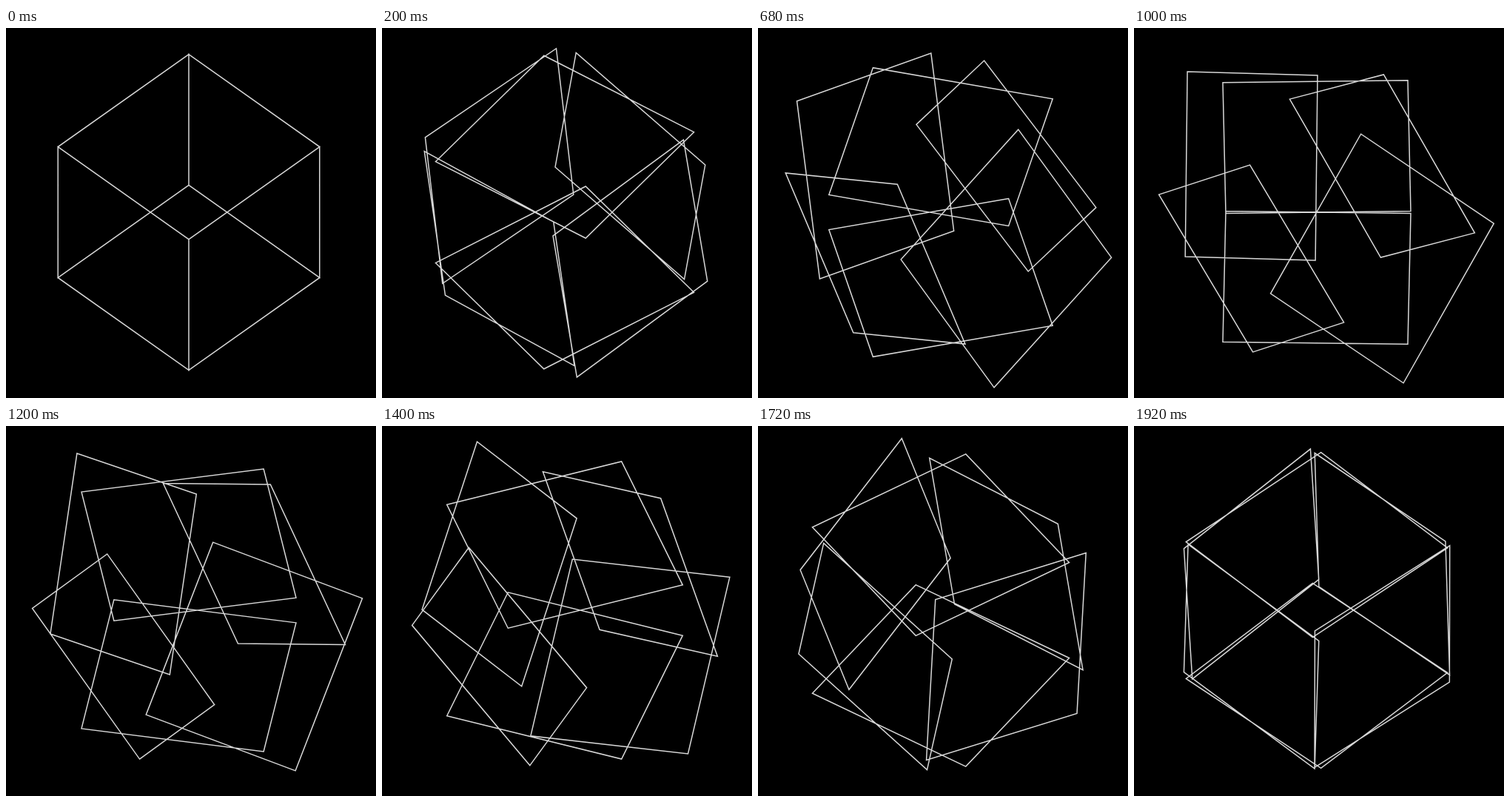
Write an HTML page with a canvas that moves like this. It is 500 by 500 pixels and loops after 1960 ms.

```html
<!DOCTYPE html>
<html lang="en">
<head>
<meta charset="utf-8">
<title>Turning cube faces</title>
<style>
html, body { margin: 0; width: 100%; height: 100%; overflow: hidden; background: #000; }
canvas { display: block; width: 500px; height: 500px; }
</style>
</head>
<body>
<canvas id="stage" width="500" height="500"></canvas>
<script>
const ctx = document.getElementById('stage').getContext('2d');
const HALF = 125, CX = 247, CY = 249;
const STEP = 40, STEPS = 49;
const r = Math.SQRT1_2;

// Cube axes after a 45° turn and a 45° tilt (screen y points down)
const X = [r, -0.5, 0.5];
const Y = [0, r, r];
const Z = [-r, -0.5, 0.5];

const scale = (v, k) => v.map(n => n * k);
const add = (a, b) => a.map((n, i) => n + b[i]);
const dot = (a, b) => a[0] * b[0] + a[1] * b[1] + a[2] * b[2];
const cross = (a, b) => [
  a[1] * b[2] - a[2] * b[1],
  a[2] * b[0] - a[0] * b[2],
  a[0] * b[1] - a[1] * b[0]
];

function rotate(v, axis, angle) {
  const c = Math.cos(angle), s = Math.sin(angle);
  const along = scale(axis, dot(axis, v) * (1 - c));
  return add(add(scale(v, c), scale(cross(axis, v), s)), along);
}

// Swinging faces turn about an axis that itself moves from -X to the normal
const faces = [];
for (const side of [1, -1]) {
  faces.push({ normal: scale(X, side), u: Y, v: Z });
  faces.push({ normal: scale(Y, side), u: Z, v: X });
  faces.push({ normal: scale(Z, side), u: X, v: Y, swing: true });
}

function traceFace({ normal, u, v, swing }, angle) {
  const axis = swing
    ? add(scale(X, -Math.cos(angle)), scale(normal, Math.sin(angle)))
    : normal;
  const a = rotate(u, axis, angle);
  const b = rotate(v, axis, angle);
  [[1, 1], [1, -1], [-1, -1], [-1, 1]].forEach(([i, j], n) => {
    const p = add(normal, add(scale(a, i), scale(b, j)));
    const x = CX + p[0] * HALF, y = CY + p[1] * HALF;
    if (n) ctx.lineTo(x, y);
    else ctx.moveTo(x, y);
  });
  ctx.closePath();
}

function draw() {
  const step = Math.floor(performance.now() / STEP) % STEPS;
  const angle = step / STEPS * Math.PI / 2;
  ctx.fillStyle = '#000';
  ctx.fillRect(0, 0, 500, 500);
  ctx.strokeStyle = '#d8d8d8';
  ctx.lineWidth = 1.5;
  // One stroke for all faces, so shared edges do not grow brighter
  ctx.beginPath();
  for (const face of faces) traceFace(face, angle);
  ctx.stroke();
  requestAnimationFrame(draw);
}
draw();
</script>
</body>
</html>
```
